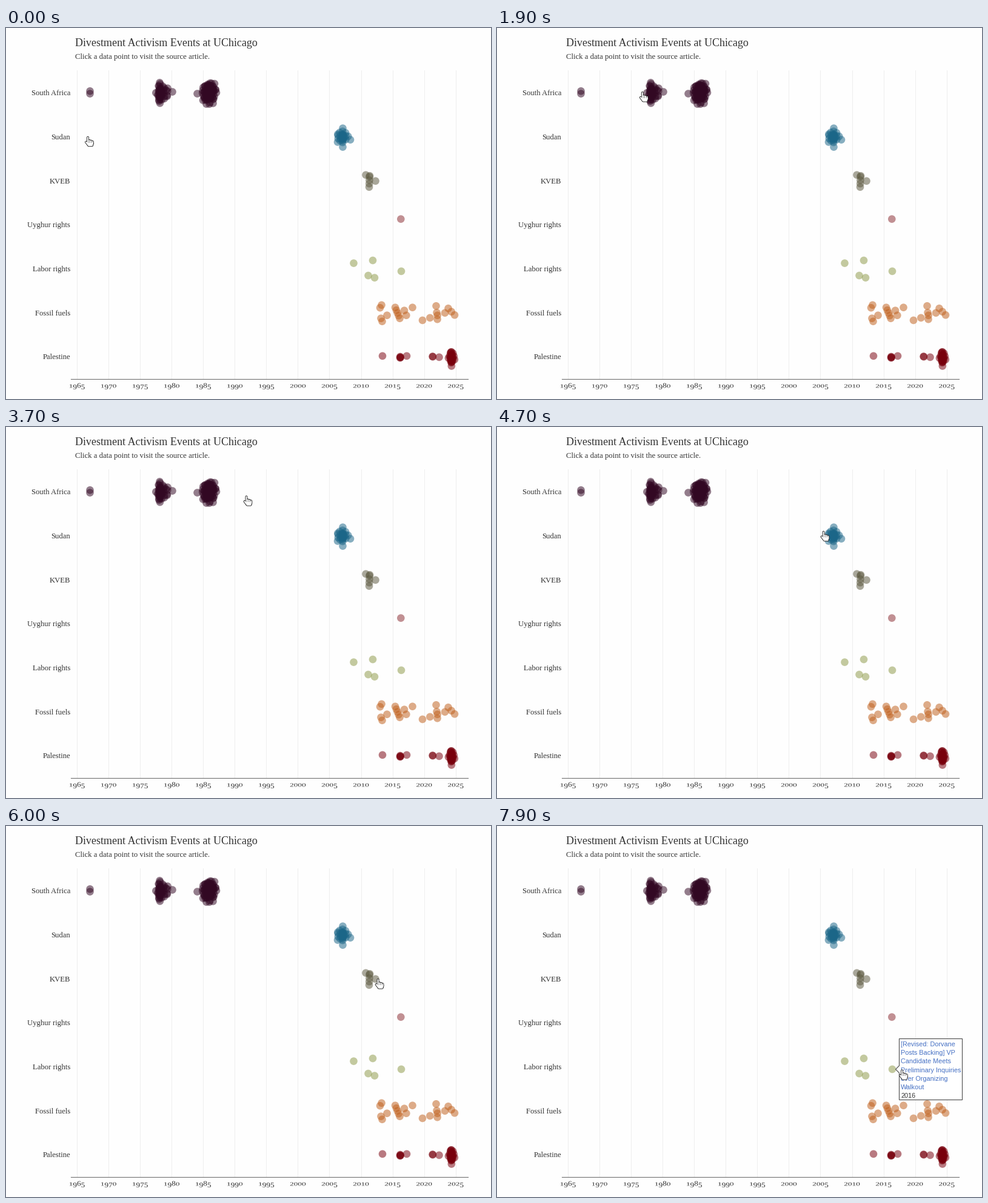
Recreate the animation shown at these times as a matplotlib script. Size 800x613 px, loop 8000 ms.

```python
import numpy as np
import matplotlib.pyplot as plt
from matplotlib.animation import FuncAnimation
from matplotlib.collections import PatchCollection
from matplotlib.patches import Circle, PathPatch, Polygon
from matplotlib.textpath import TextPath
from matplotlib.transforms import Affine2D

W, H, DPI = 800, 613, 100
PT = 72 / DPI
FRAMES, STEP = 80, 100
INK, LINK = "#333333", "#4570c4"
ROW_TOP, ROW_GAP = 107, 72.65

rng = np.random.default_rng(12)
fig = plt.figure(figsize=(W / DPI, H / DPI), dpi=DPI, facecolor="#fefefe")
ax = fig.add_axes([0, 0, 1, 1])
ax.set(xlim=(0, W), ylim=(H, 0))
ax.axis("off")


def label(x, y, text, size, color=INK, font="Liberation Serif", **kw):
    return ax.text(x, y, text, size=size * PT, color=color, family=font,
                   va="baseline", **kw)


def old_style(cx, base, text, size=13.3):
    """Old-style figures: 0-2 at x-height, 6 and 8 tall, the rest hanging."""
    step = size / 2
    x = cx - step * len(text) / 2
    for ch in text:
        sy = 0.63 if ch in "012" else 0.86
        drop = 2.6 if ch in "34579" else 0
        glyph = TextPath((0, 0), ch, size=size,
                         prop={"family": "Liberation Serif"})
        place = Affine2D().scale(1, -sy).translate(x, base + drop)
        ax.add_patch(PathPatch(place.transform_path(glyph), fc=INK, lw=0))
        x += step


def swarm(x, dy, rx=0, ry=0, n=1):
    """Dots spiralling out to fill an ellipse, with a little jitter."""
    k = np.arange(n)
    r = np.sqrt((k + 0.5) / n)
    a = np.pi / 2 + k * np.pi * (3 - np.sqrt(5))
    jx, jy = rng.uniform(-0.15, 0.15, (2, n))
    return zip(x + rx * (r * np.cos(a) + jx), dy + ry * (r * np.sin(a) + jy))


def slope(x0, dy0, x1, dy1, n):
    """Evenly spaced dots along a line."""
    return zip(np.linspace(x0, x1, n), np.linspace(dy0, dy1, n))


# Chart frame
label(114, 29.5, "Divestment Activism Events at UChicago", 17.95)
label(114, 51.5, "Click a data point to visit the source article.", 12.75)
for i in range(13):
    x = 117 + 52.06 * i
    ax.plot([x, x], [70, 579], color="#eeeeee", lw=PT, zorder=1)
    old_style(x, 594.3, str(1965 + 5 * i))
ax.plot([107, 762], [579.5, 579.5], color="#707070", lw=1.1 * PT, zorder=2)

# Each row: name, colour, groups of dots placed relative to the row's height
rows = [
    ("South Africa", "#320823", [
        swarm(138.5, 0, 0, 3.8, 2), swarm(253.3, 0.5, 2, 18, 18),
        swarm(258, 0, 10, 11, 22), swarm(274.5, -1.5), swarm(315.5, 1.5),
        swarm(335, 0, 11, 18, 64), swarm(344, -15)]),
    ("Sudan", "#1b6688", [
        swarm(555.5, 0.5, 1, 6, 9), swarm(554.5, 0, 10, 10, 18),
        slope(555.5, -14, 555.5, 17, 2), swarm(568, 5)]),
    ("KVEB", "#5b583f", [
        slope(593.5, -9.5, 600, -8, 2), slope(599.5, -6.5, 599, 10.5, 4),
        swarm(609.5, 0.5)]),
    ("Uyghur rights", "#8a2b31", [swarm(651.3, -9.3)]),
    ("Labor rights", "#8d9a48", [
        slope(573.5, -9, 605, -13.6, 2), slope(597.5, 11.4, 608, 15, 2),
        swarm(652, 4.3)]),
    ("Fossil fuels", "#c0601c", [
        slope(617, -8, 619.5, -12.5, 2), slope(618.5, 9.5, 620.5, 14.5, 2),
        swarm(628.5, 4.5), slope(642, -8.5, 649.5, 9.5, 5),
        slope(657, -3.5, 660.3, 4.5, 2), swarm(670.5, -8.5),
        slope(687, 12.7, 724, 0.5, 4), slope(709.5, -11, 711.5, 11, 3),
        slope(729.5, -7, 740, 4, 3)]),
    ("Palestine", "#78000c", [
        swarm(621, -1), swarm(650.3, 1, 0.5, 2, 4), swarm(661, -1),
        swarm(704, 0, 0.5, 0.5, 2), swarm(714.5, 1),
        swarm(734.5, 2.5, 1, 13, 16), swarm(735, 1, 6.5, 8, 14)]),
]
for i, (name, color, groups) in enumerate(rows):
    y = ROW_TOP + ROW_GAP * i
    label(106, y + 4.3, name, 12.65, ha="right")
    discs = [Circle((x, y + dy), 6.3) for group in groups for x, dy in group]
    ax.add_collection(PatchCollection(discs, fc=color, alpha=0.52, lw=0,
                                      zorder=3))


class Tooltip:
    """Box beside a dot: link lines and a year, shown while hovered."""

    def __init__(self, x, y, width, lines, year):
        self.x, self.y = x, y
        count = len(lines) + 1
        left, top = x + 11.5, y - 7 * count - 1.5
        self.right, self.bottom = left + width, y + 7 * count + 1.5
        self.left, self.top = left, top
        shape = [(left, top), (self.right, top), (self.right, self.bottom),
                 (left, self.bottom), (left, y + 6), (x + 5.5, y),
                 (left, y - 6)]
        self.parts = [ax.add_patch(Polygon(shape, fc="white", ec="#555555",
                                           lw=1.2 * PT, zorder=5))]
        for k, line in enumerate(lines + [year]):
            color = LINK if k < len(lines) else INK
            self.parts.append(label(left + 2.6, top + 12.8 + 14.1 * k, line,
                                    10.85, color, "Liberation Sans",
                                    zorder=6))

    def hover(self, px, py):
        """Update visibility; return whether the pointer is on the year."""
        in_box = (self.left < px < self.right
                  and self.top < py < self.bottom)
        on_dot = self.x - 7 < px <= self.left and abs(py - self.y) < 7
        for part in self.parts:
            part.set_visible(in_box or on_dot)
        return in_box and py > self.bottom - 17


tooltips = [
    Tooltip(568, 185, 92, ["Column: For", "endowment,",
                           "Trustees not at all", "in earnest"], "2008"),
    Tooltip(651, 316, 107, ["Petition over", "Textiles,",
                            "Statement About", "Trade on DB Ballot"], "2016"),
    Tooltip(652, 402, 104, ["[Revised: Dorvane", "Posts Backing] VP",
                            "Candidate Meets", "Preliminary Inquiries",
                            "over Organizing", "Walkout"], "2016"),
]

# Hand: round strokes for fingers, thumb and palm, dark below and white above
GAP = (np.nan, np.nan)
strokes = [[(2.6 * k, top), (2.6 * k, 11.5), GAP]
           for k, top in enumerate((1.2, 6.3, 7, 8.2))]
strokes += [[(0.6 * k, 11.5 + 1.6 * k), (7.8 - 0.4 * k, 11.5 + 1.6 * k), GAP]
            for k in range(3)]
strokes += [[(-3, 9), (0.5, 13.5), GAP]]
HAND = np.concatenate(strokes)
hand = [ax.plot([], [], color=c, lw=w * PT, solid_capstyle="round", zorder=z)[0]
        for c, w, z in (("#222222", 3.9, 8), ("white", 2.1, 9))]

ARROW = np.array([(0, 0), (0, 11.5), (2.6, 9), (4.4, 13), (6.2, 12.2),
                  (4.5, 8.3), (8, 8.3)])
arrow = ax.add_patch(Polygon(ARROW, fc="white", ec="#222222", lw=PT, zorder=8))

# Pointer track: time, x, y
TRACK = np.array([
    (0, 135, 179.5), (600, 140, 112), (1100, 171.5, 107.2),
    (2600, 299.5, 104.5), (3700, 396.5, 114), (4900, 567, 184),
    (5500, 585.5, 212), (6700, 653, 310), (7900, 668, 403)])


def draw(frame):
    x, y = (np.interp(frame * STEP, TRACK[:, 0], TRACK[:, k]) for k in (1, 2))
    on_year = any([tip.hover(x, y) for tip in tooltips])
    for line in hand:
        line.set_data(*(HAND + (x, y)).T)
        line.set_visible(not on_year)
    arrow.set_xy(ARROW + (x, y))
    arrow.set_visible(on_year)
    return [*hand, arrow]


anim = FuncAnimation(fig, draw, frames=FRAMES, interval=STEP, repeat=True,
                     repeat_delay=0, blit=False)
plt.show()
```
